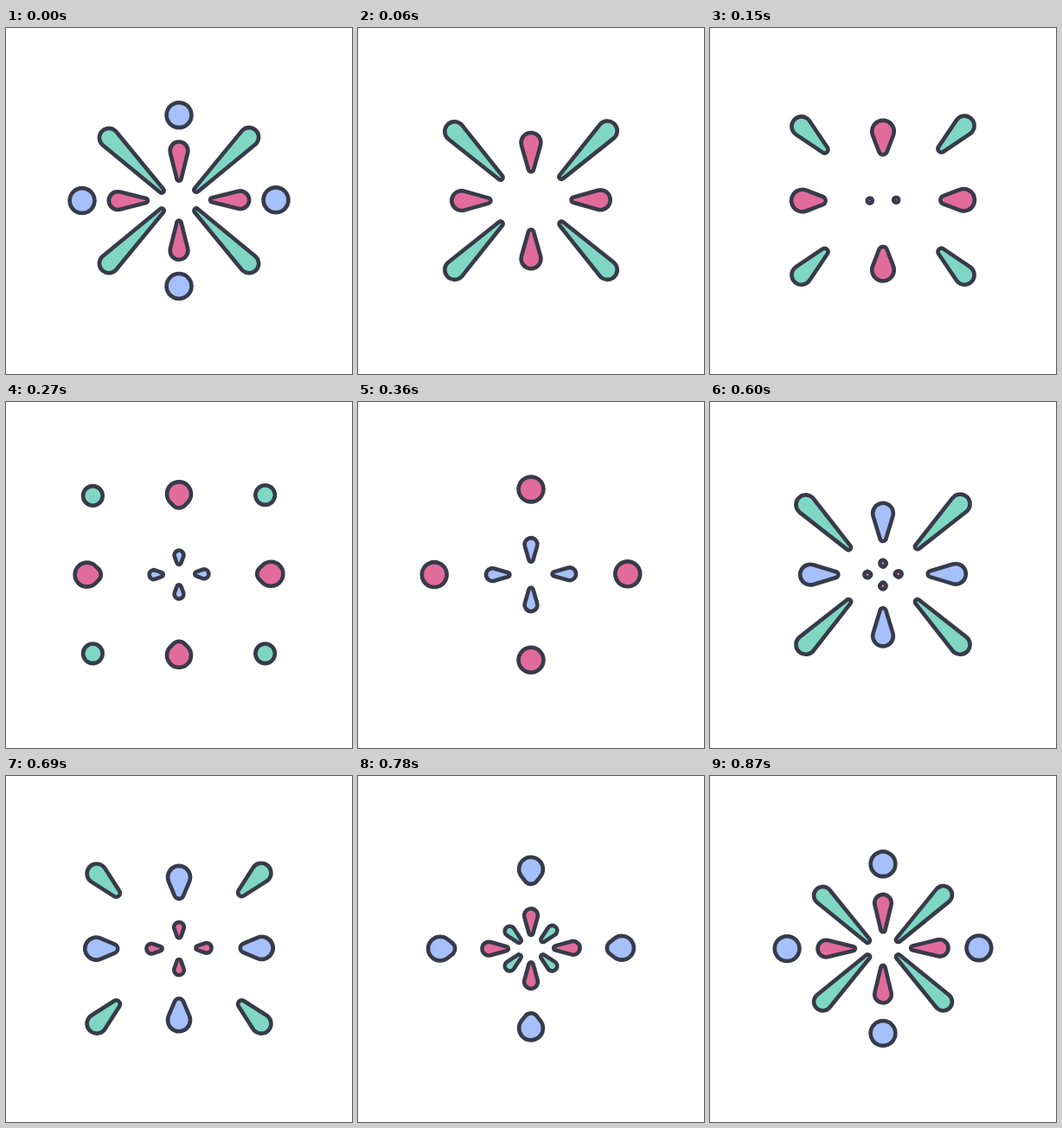
Animation, 400 px wide and 400 px high, one loop 0.9 s. Source, as an HTML page with a canvas:

```html
<!DOCTYPE html>
<html lang="en">
<head>
<meta charset="utf-8">
<title>Burst</title>
<style>
  html, body { margin: 0; width: 100%; height: 100%; overflow: hidden; background: #fff; }
  canvas { display: block; width: 400px; height: 400px; }
</style>
</head>
<body>
<canvas id="stage" width="400" height="400"></canvas>
<script>
const ctx = document.getElementById('stage').getContext('2d');
const LOOP = 900, STEP = 30, LINE = 4.6, LEAD = 15;
const INK = '#373a49', BLUE = '#a5c0fb', PINK = '#e16c9c', GREEN = '#7fd7c3';
const AXES = [[0, -1], [0, 1], [-1, 0], [1, 0]];
const DIAGONALS = [[-1, -1], [1, -1], [-1, 1], [1, 1]];

const ramp = (t, from, to) => Math.min(1, Math.max(0, (t - from) / (to - from)));
const rise = u => Math.sin(u * Math.PI / 2);

// Ease from 0 to 1 with a given start speed, ending at rest
const ease = (u, speed = 0) => speed * u * (1 - u) ** 2 + u * u * (3 - 2 * u);

// A drop leaves the centre, its tail follows later and it rounds into a ball
function ballPose(age, life) {
  const p = ramp(age, 0, life), q = ramp(p, 0.4, 0.95);
  const head = 10.5 + 89 * ease(p, 0.85);
  const headR = 0.7 + 11.5 * rise(p);
  return {
    head, headR,
    tail: Math.min(head, 10.5 + 28 * p + 62 * ease(q, 0.4)),
    tailR: Math.min(headR, 0.2 + 12 * q * q),
    wide: 4.7 + 8.4 * ease(ramp(p, 0, 0.45))
  };
}

// A ray shoots out, slows down, then its tail catches up
function rayPose(age) {
  const shoot = ramp(age, 0, 192), follow = ramp(age, 147, 455);
  const head = 9.5 + 65 * ease(shoot, 0.3) + 17 * ease(ramp(age, 112, 462), 0.6);
  const headR = 0.7 + 8.3 * rise(shoot);
  return {
    head, headR,
    tail: Math.min(head, 9.5 + 82 * ease(follow, 0.45)),
    tailR: Math.min(headR, 0.4 + 8.8 * follow ** 3),
    wide: 3.5 + 4.9 * ease(ramp(age, 0, 150))
  };
}

const layers = [
  { color: GREEN, dirs: DIAGONALS, pose: rayPose, start: 738, life: 460 },
  { color: GREEN, dirs: DIAGONALS, pose: rayPose, start: 364, life: 410 },
  { color: BLUE, dirs: AXES, pose: ballPose, start: 165, life: 780 },
  { color: PINK, dirs: AXES, pose: ballPose, start: 575, life: 735 }
];

// Filled outline around a head circle and a tail circle
function drop(x1, y1, r1, x2, y2, r2, color) {
  const d = Math.hypot(x1 - x2, y1 - y2);
  ctx.beginPath();
  if (d <= Math.abs(r1 - r2) + 0.01) {
    ctx.arc(x1, y1, Math.max(r1, r2), 0, Math.PI * 2);
  } else {
    const back = Math.atan2(y2 - y1, x2 - x1), phi = Math.acos((r1 - r2) / d);
    ctx.arc(x1, y1, r1, back + phi, back - phi + Math.PI * 2);
    ctx.arc(x2, y2, r2, back - phi, back + phi);
  }
  ctx.fillStyle = color;
  ctx.fill();
}

function drawLayer({ color, dirs, pose, start, life }, time) {
  const age = time - start;
  if (age < -LEAD || age >= life * 0.98) return;
  const { head, headR, tail, tailR, wide } = pose(age, life);
  for (const [sx, sy] of dirs) {
    // Sideways drops show a moment before the others
    if (sy !== 0 && age < 0) continue;
    const cy = sx > 0 && sy <= 0 ? 198.8 : 199.6;
    const x1 = 200 + sx * (head + wide), y1 = cy + sy * head;
    const x2 = 200 + sx * (tail + wide), y2 = cy + sy * tail;
    drop(x1, y1, headR + LINE, x2, y2, tailR + LINE, INK);
    drop(x1, y1, headR, x2, y2, tailR, color);
  }
}

function draw(now) {
  const t = Math.floor(now % LOOP / STEP) * STEP;
  ctx.fillStyle = '#fff';
  ctx.fillRect(0, 0, 400, 400);
  for (const layer of layers) {
    drawLayer(layer, t);
    drawLayer(layer, t + LOOP);
  }
}

const begin = performance.now();
function tick() {
  draw(performance.now() - begin);
  requestAnimationFrame(tick);
}
tick();
</script>
</body>
</html>
```
